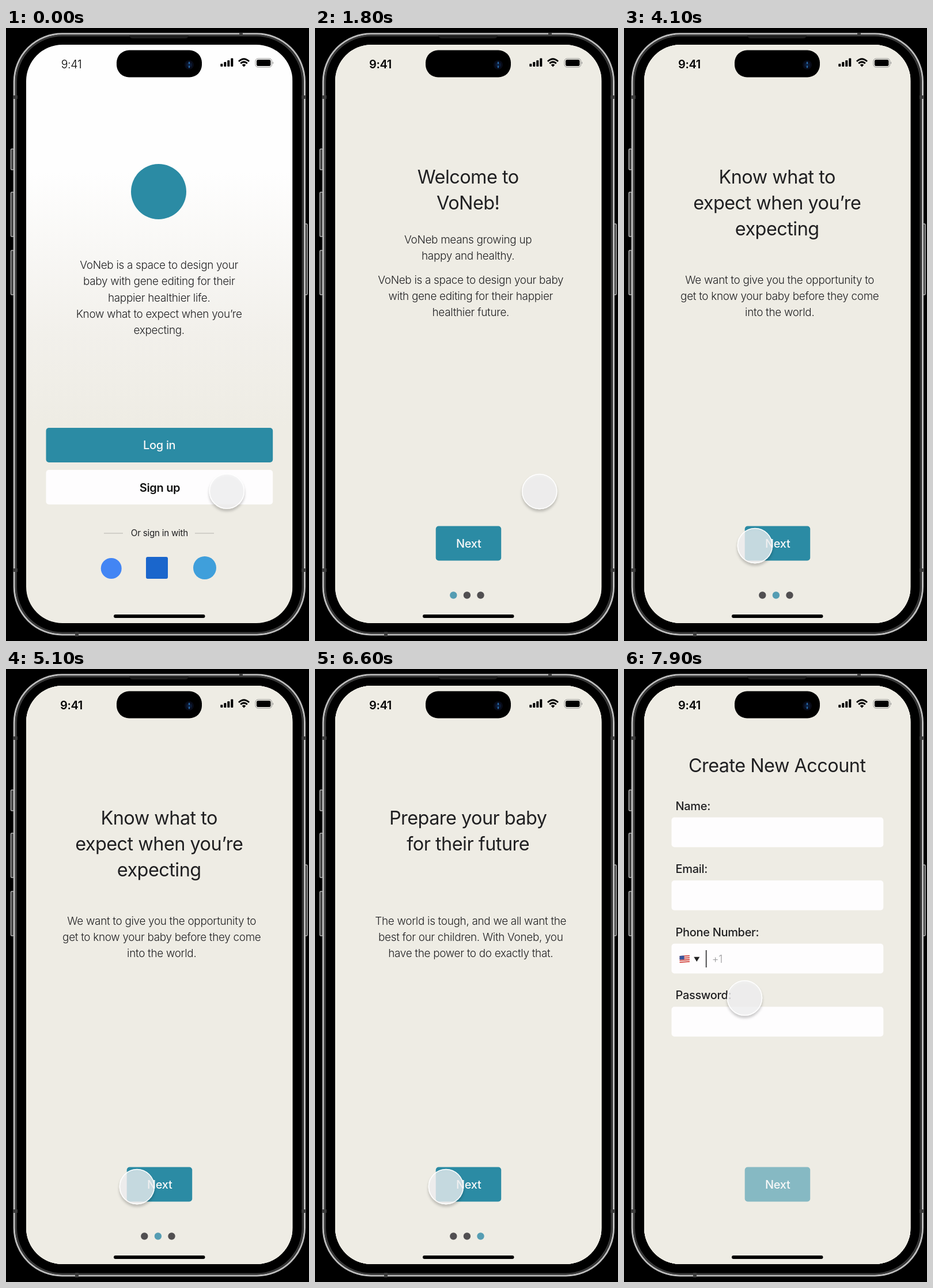
Recreate the animation shown at these times as an HTML page. Size 526 by 1064 pixels, loop 8 s.

```html
<!DOCTYPE html>
<html lang="en">
<head>
<meta charset="utf-8">
<title>Onboarding flow</title>
<style>
  html, body { margin: 0; width: 100%; height: 100%; overflow: hidden; background: #000; }
  svg { display: block; width: 526px; height: 1064px; }
  text { font-family: Inter, Roboto, sans-serif; fill: #202022; text-anchor: middle; letter-spacing: -0.016em; }
  .title { font-size: 32.4px; font-weight: 400; }
  .body { font-size: 18.9px; font-weight: 350; }
  .label { font-size: 20px; font-weight: 500; text-anchor: start; }
  .button { font-size: 20px; font-weight: 500; fill: #f8f8f8; }
  .clock { font-size: 20px; font-weight: 600; fill: #000; }
  .thin { font-size: 19.5px; font-weight: 300; }
</style>
</head>
<body>
<svg viewBox="0 0 526 1064" xmlns="http://www.w3.org/2000/svg">
  <defs>
    <clipPath id="display"><rect x="35" y="29" width="462.5" height="1004" rx="63"/></clipPath>
    <linearGradient id="fade" x1="0" y1="0" x2="0" y2="1">
      <stop offset=".22" stop-color="#fefefe"/>
      <stop offset=".5" stop-color="#f2f0eb"/>
      <stop offset=".66" stop-color="#eeece4"/>
    </linearGradient>
    <filter id="shadow" x="-30%" y="-30%" width="160%" height="170%">
      <feDropShadow dx="0" dy="4" stdDeviation="2.2" flood-color="#000" flood-opacity=".25"/>
    </filter>
  </defs>

  <rect width="526" height="1064" fill="#000"/>
  <g id="sideButtons" fill="#3a3a3a" stroke="#b4b4b4" stroke-width="1.5"></g>
  <rect x="14.2" y="10" width="504.3" height="1043" rx="83" fill="#000" stroke="#bcbcbc" stroke-width="3"/>
  <rect x="17.5" y="13" width="497.5" height="1037" rx="80" fill="none" stroke="#393939" stroke-width="3"/>
  <path d="M214 13H317Q316 18 311 18H220Q215 18 214 13Z" fill="#1d1d1d"/>
  <path d="M12 120H20M513 120H521M12 941H20M513 941H521M123 1048V1056M408 8V14" stroke="#3c3c3c" stroke-width="6"/>

  <g id="screens" clip-path="url(#display)"></g>

  <rect x="192" y="42" width="148" height="43.5" rx="21.7"/>
  <circle cx="318" cy="64" r="8" fill="#080b18"/>
  <circle cx="318" cy="64" r="5" fill="#0b1a35"/>
  <path d="M318 59.5V62M318 66V68.5" stroke="#286baa" stroke-width="2" stroke-linecap="round"/>

  <g id="cursor" filter="url(#shadow)">
    <circle r="30" fill="#f3f3f5" fill-opacity=".75" stroke="#fff" stroke-width="1.5"/>
  </g>
</svg>
<script>
const LOOP = 8000, SLIDE = 300, WIDTH = 462.5;
const TEAL = '#2b8ba4', CREAM = '#eeece4', MID = 265.7;
const byId = id => document.getElementById(id);

const rect = (x, y, w, h, fill, rx = 0) =>
  `<rect x="${x}" y="${y}" width="${w}" height="${h}" rx="${rx}" fill="${fill}"/>`;
const circle = (x, y, r, fill) => `<circle cx="${x}" cy="${y}" r="${r}" fill="${fill}"/>`;
const text = (str, x, y, kind, extra = '') => `<text class="${kind}" x="${x}" y="${y}" ${extra}>${str}</text>`;
const lines = (list, x, y, step, kind) => list.map((str, i) => text(str, x, y + i * step, kind)).join('');

const statusBar = clockKind =>
  text('9:41', 113.5, 69.5, clockKind) +
  rect(192, 38.5, 148, 43.5, '#000', 21.7) +
  [5, 8, 11, 14.5].map((h, i) => rect(372.3 + i * 6, 67 - h, 4, h, '#000', 1)).join('') +
  `<g fill="none" stroke="#000" stroke-width="3">
    <path d="M404 58Q413 49.5 422 58M407.2 61.5Q413 56.3 418.8 61.5"/></g>
  <path d="M409.6 64Q413 61 416.4 64L413 67.4Z"/>
  <rect x="433" y="53" width="28.5" height="15" rx="4.5" fill="none" stroke="#8d8d8b"/>
  <path d="M463 58Q465.4 60.5 463 63Z" fill="#8d8d8b"/>` +
  rect(435, 55, 24.5, 11, '#000', 2.8);

const frame = (content, fill = CREAM, clockKind = 'clock') =>
  rect(35, 29, WIDTH, 1004, fill) + statusBar(clockKind) + content +
  rect(187, 1018, 158.5, 6, '#000', 3);

const nextButton = fill => rect(209.7, 864.5, 113.5, 60, fill, 5) + text('Next', 266.7, 902, 'button');

const login = frame(
  circle(265, 284, 48, TEAL) +
  lines(['VoNeb is a space to design your', 'baby with gene editing for their',
    'happier healthier life.', 'Know what to expect when you’re', 'expecting.'], MID, 418, 28.3, 'body') +
  rect(69.5, 694, 393.7, 60, TEAL, 5) + text('Log in', 266.2, 731, 'button') +
  rect(69.5, 767, 393.7, 60, '#fefdfe', 5) +
  text('Sign up', 267, 804.5, 'button', 'style="fill:#111;font-weight:600"') +
  rect(170, 876.5, 33, 1, '#b5b4af') + rect(328, 876.5, 33, 1, '#b5b4af') +
  text('Or sign in with', 266.4, 882, 'body', 'style="font-size:15.2px;font-weight:400"') +
  circle(182.7, 938, 18, '#4285f4') + rect(243, 918, 38, 38, '#1a66cc', 3) + circle(345, 937, 20, '#3f9fdb'),
  'url(#fade)', 'clock thin');

const intro = (step, title, content) => frame(
  lines(title, MID, 269.5, 45, 'title') + content + nextButton(TEAL) +
  [0, 1, 2].map(i => circle(240.3 + i * 23.6, 984.5, 6.2, i === step ? '#559db3' : '#514f51')).join(''));
const paragraph = list => lines(list, 270.3, 443.5, 28.3, 'body');

const welcome = intro(0, ['Welcome to', 'VoNeb!'],
  lines(['VoNeb means growing up', 'happy and healthy.'], MID, 374, 28.3, 'body') +
  paragraph(['VoNeb is a space to design your baby', 'with gene editing for their happier', 'healthier future.']));
const expecting = intro(1, ['Know what to', 'expect when you’re', 'expecting'],
  paragraph(['We want to give you the opportunity to', 'get to know your baby before they come', 'into the world.']));
const future = intro(2, ['Prepare your baby', 'for their future'],
  paragraph(['The world is tough, and we all want the', 'best for our children. With Voneb, you', 'have the power to do exactly that.']));

const flag = `<g transform="translate(96.5 498) skewY(-4)">` + rect(0, 0, 17.5, 12, '#f3eeee', 1) +
  [0, 1, 2, 3].map(i => rect(0, i * 3.4, 17.5, 1.8, '#d5453f', .5)).join('') + rect(0, 0, 8, 6.6, '#38569c', .5) + '</g>';
const account = frame(
  text('Create New Account', MID, 178.5, 'title') +
  ['Name:', 'Email:', 'Phone Number:', 'Password:'].map((label, i) => {
    const y = 257.5 + i * 109.6;
    return text(label, 89.5, y - 13, 'label') + rect(82.5, y, 367.8, 51.7, '#fefdfe', 5);
  }).join('') +
  flag + '<path d="M121.3 499.8H131.3L126.3 508Z" fill="#222"/>' + rect(141.8, 488, 1.8, 30, '#3c3c3e') +
  text('+1', 162, 510, 'thin', 'style="fill:#9b9b9d;font-size:18px"') + nextButton('#86b9c3'));

const screens = [
  { start: -SLIDE, content: login },
  { start: 1300, content: welcome },
  { start: 3695, content: expecting },
  { start: 5194, content: future },
  { start: 6680, content: account },
];
byId('screens').innerHTML = screens.map(s => `<g>${s.content}</g>`).join('');
const layers = [...byId('screens').children];
byId('sideButtons').innerHTML = [[8.5, 210, 36], [8.5, 285, 77], [8.5, 386, 77], [518, 340, 123]]
  .map(([x, y, h]) => `<rect x="${x}" y="${y}" width="5" height="${h}" rx="1.5"/>`).join('');

const cursorMoves = [
  { from: 100, to: 900, a: [383.3, 804], b: [389.8, 804.5] },
  { from: 2450, to: 3500, a: [389.8, 804.5], b: [227.4, 898.5] },
  { from: 7530, to: 7900, a: [227.4, 898.5], b: [209.5, 571] },
];

const clamp = v => Math.min(1, Math.max(0, v));
const smooth = v => v * v * (3 - 2 * v);

// cubic-bezier(0, 0, .58, 1)
function easeOut(x) {
  let lo = 0, hi = 1;
  for (let i = 0; i < 24; i++) {
    const s = (lo + hi) / 2;
    if (1.74 * s * s * (1 - s) + s ** 3 < x) lo = s; else hi = s;
  }
  return smooth(hi);
}

function render(t) {
  screens.forEach(({ start }, i) => {
    const p = clamp((t - start) / SLIDE);
    layers[i].setAttribute('display', p > 0 ? 'inline' : 'none');
    layers[i].setAttribute('transform', `translate(${p < 1 ? WIDTH * (1 - easeOut(p)) : 0} 0)`);
  });
  const move = cursorMoves.findLast(m => t >= m.from) || cursorMoves[0];
  const k = smooth(clamp((t - move.from) / (move.to - move.from)));
  const [x, y] = move.a.map((v, i) => v + (move.b[i] - v) * k);
  byId('cursor').setAttribute('transform', `translate(${x} ${y})`);
}

const origin = performance.now();
function tick() {
  render((performance.now() - origin) % LOOP);
  requestAnimationFrame(tick);
}
tick();
</script>
</body>
</html>
```
